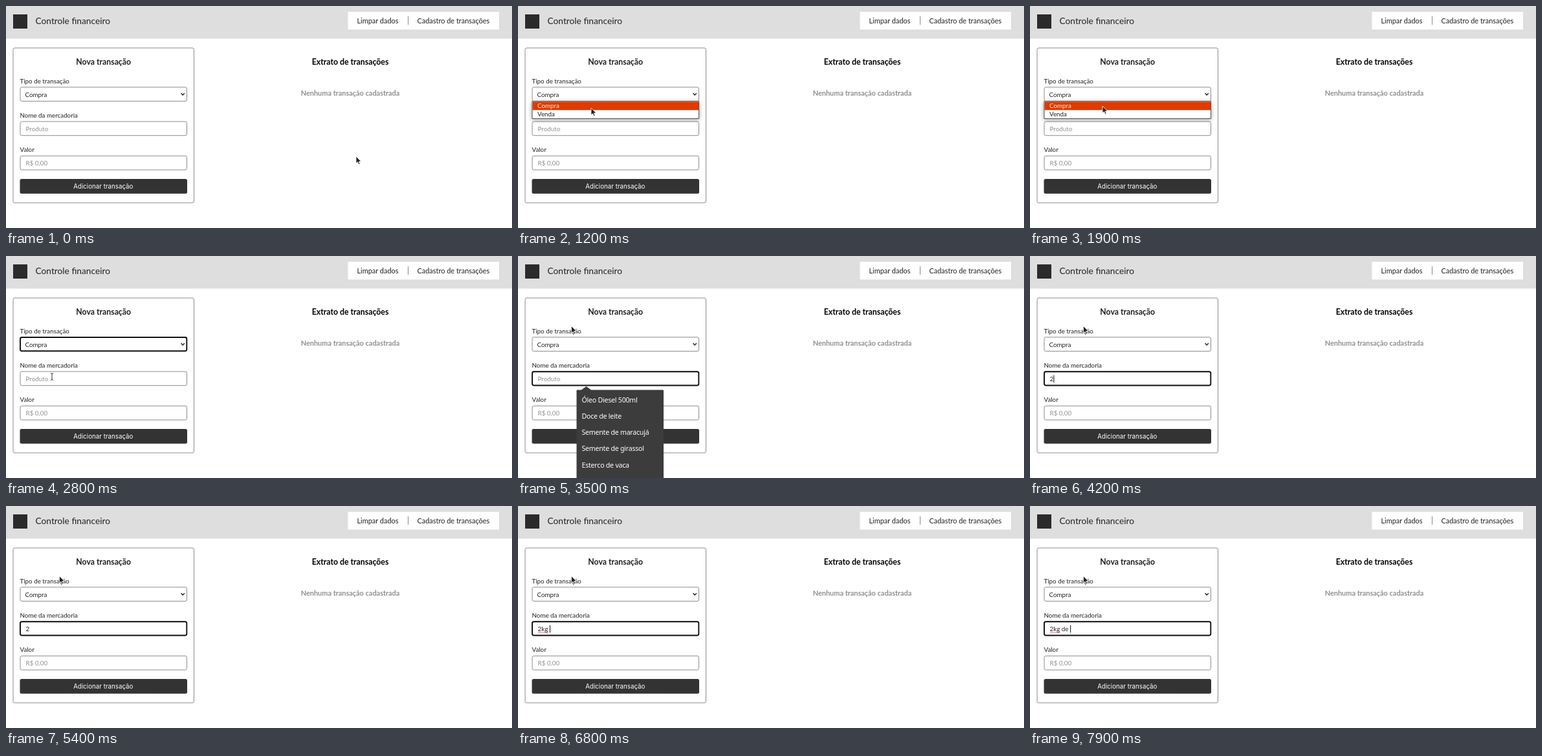
An HTML page for the animation above (8 s loop, 782 px wide and 344 px high).

```html
<!DOCTYPE html>
<html lang="pt-BR">
<head>
<meta charset="utf-8">
<title>Controle financeiro</title>
<style>
  html, body { margin: 0; width: 100%; height: 100%; overflow: hidden; background: #fff; }
  svg { display: block; width: 782px; height: 344px; font: 9.8px Lato, sans-serif; fill: #222; }
  .bold { font-weight: 700; font-size: 12.3px; text-anchor: middle; }
  .nav { font-size: 10.95px; }
  .hint { fill: #909090; }
  .field { fill: #fff; stroke: #8c8c8c; }
  .ring { fill: none; stroke: #111; stroke-width: 1.9; }
  .popup { font: 10.6px "Noto Sans", sans-serif; letter-spacing: -.23px; fill: #fff; }
</style>
</head>
<body>
<svg viewBox="0 0 782 344">
  <rect width="782" height="50.5" fill="#dedede"/>
  <rect x="11" y="13" width="22" height="22" fill="#2b2b2b"/>
  <text x="45.5" y="27.8" font-size="13.75">Controle financeiro</text>
  <rect x="528.5" y="9" width="233.5" height="27.5" fill="#fff"/>
  <text class="nav" x="542.5" y="27">Limpar dados</text>
  <path d="M621.5 16V29" stroke="#8a8a8a"/>
  <text class="nav" x="635.5" y="27">Cadastro de transações</text>

  <rect class="field" x="11" y="65" width="279.5" height="240" rx="2.5"/>
  <text class="bold" x="150.7" y="91.3">Nova transação</text>
  <text x="21.5" y="119.8">Tipo de transação</text>
  <rect class="field" x="22" y="125.8" width="257.5" height="21.7" rx="2.5"/>
  <text x="29.5" y="140.5">Compra</text>
  <path d="M270.6 135.2l2.6 2.7 2.6-2.7" fill="none" stroke="#222" stroke-width="1.5"/>
  <text x="21.5" y="173">Nome da mercadoria</text>
  <rect class="field" x="22" y="179" width="257.5" height="21.7" rx="2.5"/>
  <text x="21.5" y="226.3">Valor</text>
  <rect class="field" x="22" y="232.3" width="257.5" height="21.7" rx="2.5"/>
  <text class="hint" x="30.5" y="247.3">R$ 0,00</text>
  <rect x="21.5" y="268" width="258.5" height="22.7" rx="2.5" fill="#333"/>
  <text x="150.3" y="283" text-anchor="middle" style="font:9.75px Inter,sans-serif" fill="#fff">Adicionar transação</text>

  <text class="bold" x="532" y="91.3" style="fill:#000">Extrato de transações</text>
  <text class="bold hint" x="532" y="139.3" style="font-size:10.95px">Nenhuma transação cadastrada</text>

  <text class="hint" id="hint" x="30.5" y="194">Produto</text>
  <text id="typed" x="30.5" y="194"></text>
  <path id="spell" d="M31 196.3H46.5" stroke="#d83a3a" stroke-width="1.1" stroke-dasharray="1.6 .7"/>
  <rect id="caret" y="184.6" width="1" height="11.6" fill="#111"/>
  <rect class="ring" id="selectRing" x="22" y="126" width="257.3" height="21.3" rx="2.5"/>
  <rect class="ring" id="nameRing" x="22" y="179.2" width="257.3" height="21.3" rx="2.5"/>

  <g id="menu">
    <rect x="22" y="148" width="257.5" height="26.5" fill="#fff" stroke="#555" style="filter:drop-shadow(0 1px 3px #0006)"/>
    <rect id="pick" x="22.5" width="256.5" height="12.8" fill="#e03a00"/>
    <text id="buy" x="30" y="158.4">Compra</text>
    <text id="sell" x="30" y="171">Venda</text>
  </g>

  <g id="popup" class="popup">
    <path d="M90.5 208.5q0-1 1-1H98L105.5 202 113 207.5H224q1 0 1 1V344H90.5z" fill="#3c3c3c"/>
  </g>

  <path id="arrow" d="M0 0V11L2.5 8.7 4.3 12.6 6.1 11.8 4.4 8H7.8z" fill="#222" stroke="#fff" stroke-width=".8"/>
  <path id="beam" d="M-2.2-5.3Q0-5.3 0-4V4Q0 5.3-2.2 5.3M2.2-5.3Q0-5.3 0-4M0 4Q0 5.3 2.2 5.3" fill="none" stroke="#333"/>
</svg>
<script>
const LOOP = 8000, TICK = 100;
const el = id => document.getElementById(id);
const show = (id, on) => el(id).setAttribute('visibility', on ? 'visible' : 'hidden');
const within = (t, from, to) => t >= from && t < to;
const ease = p => p * p * (3 - 2 * p);

// pointer stops: time, x, y
const stops = [
  [0, 541, 233], [400, 116, 142], [1000, 116, 142], [1200, 113, 158],
  [1400, 113, 166], [1600, 113, 166], [1900, 112, 155], [2100, 112, 155],
  [2800, 71, 187], [3000, 73, 188], [3300, 82.5, 108.5], [LOOP, 82.5, 108.5]
];
const typing = [[0, ''], [4100, '2'], [6500, '2k'], [6600, '2kg'], [6800, '2kg '],
  [7500, '2kg d'], [7600, '2kg de'], [7800, '2kg de ']];
const caretOff = [[0, 3000], [3500, 4000], [4600, 5200], [5400, 6000], [7400, 7500]];

['Óleo Diesel 500ml', 'Doce de leite', 'Semente de maracujá', 'Semente de girassol', 'Esterco de vaca']
  .forEach((item, i) => {
    const line = document.createElementNS('http://www.w3.org/2000/svg', 'text');
    line.setAttribute('x', 98.5);
    line.setAttribute('y', 226.8 + i * 25.2);
    line.textContent = item;
    el('popup').append(line);
  });

function pointer(t) {
  const i = stops.findIndex(s => s[0] > t);
  const [t0, x0, y0] = stops[i - 1], [t1, x1, y1] = stops[i];
  const p = ease((t - t0) / (t1 - t0));
  return [x0 + (x1 - x0) * p, y0 + (y1 - y0) * p];
}

function draw(t) {
  const [x, y] = pointer(t);
  const overInput = x > 22 && x < 279 && y > 179 && y < 201;
  for (const id of ['arrow', 'beam']) el(id).setAttribute('transform', `translate(${x} ${y})`);
  show('arrow', !overInput);
  show('beam', overInput);

  const selling = y > 161;
  show('menu', within(t, 600, 2200));
  el('pick').setAttribute('y', selling ? 161.3 : 148.5);
  el('buy').setAttribute('fill', selling ? '#222' : '#ffe9dc');
  el('sell').setAttribute('fill', selling ? '#ffe9dc' : '#222');
  show('selectRing', within(t, 2200, 3000));
  show('nameRing', t >= 3000);
  show('popup', within(t, 3000, 4100));

  const text = typing.filter(s => s[0] <= t).pop()[1];
  const typed = el('typed');
  typed.textContent = text.replace(/ /g, '\u00a0');
  show('hint', !text);
  show('spell', t >= 6800);
  el('caret').setAttribute('x', 30.7 + (text ? typed.getComputedTextLength() : 0));
  show('caret', !caretOff.some(([from, to]) => within(t, from, to)));
}

function frame() {
  draw(Math.floor(performance.now() % LOOP / TICK) * TICK);
  requestAnimationFrame(frame);
}
frame();
</script>
</body>
</html>
```
